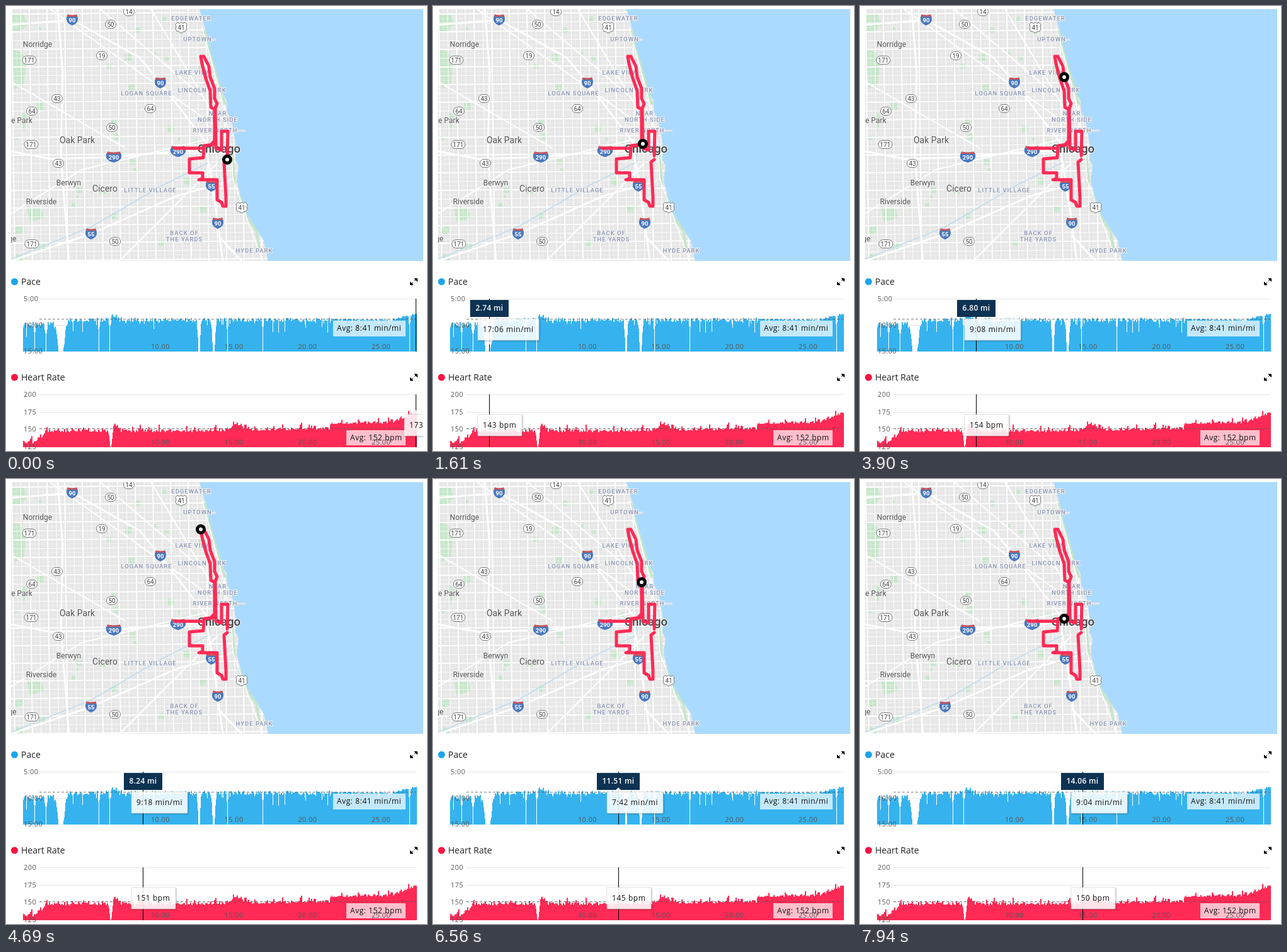
Recreate the animation shown at these times as an HTML page. Size 668 by 707 pixels, loop 8000 ms.

```html
<!DOCTYPE html>
<html lang="en">
<head>
<meta charset="utf-8">
<title>Run replay</title>
<style>
html, body { margin: 0; width: 100%; height: 100%; overflow: hidden; background: #fff; }
svg { display: block; width: 668px; height: 707px; }
text { font-family: "Open Sans", sans-serif; font-size: 12px; fill: #222; }
.map text { font-family: Roboto, sans-serif; text-anchor: middle; fill: #555; paint-order: stroke; stroke: #f2f2f2; stroke-width: 2px; stroke-linejoin: round; }
.map .town { font-size: 12px; }
.map .big { font-size: 14px; }
.map .city { font-size: 18.7px; font-weight: 500; fill: #444; }
.map .area { font-size: 9.5px; font-weight: 500; letter-spacing: 1px; fill: #8b95b3; }
.map .badge { font-size: 10px; fill: #444; stroke: none; }
.map .interstate { font-size: 9.5px; font-weight: 700; fill: #fff; stroke: none; }
.title { font-size: 14px; }
.axis { font-size: 11px; fill: #555; letter-spacing: .4px; }
.note { letter-spacing: .55px; fill: #111; }
.miles { font-weight: 600; letter-spacing: .3px; fill: #fff; text-anchor: middle; }
</style>
</head>
<body>
<svg viewBox="0 0 668 707">
  <defs>
    <clipPath id="mapClip"><rect x="8" y="5" width="654" height="400"/></clipPath>
    <clipPath id="chartClip"><rect x="8" y="420" width="654" height="281"/></clipPath>
    <filter id="shadow" x="-10%" y="-20%" width="125%" height="150%">
      <feDropShadow dx="1" dy="1" stdDeviation="1.2" flood-opacity=".4"/>
    </filter>
  </defs>
  <g class="map" clip-path="url(#mapClip)">
    <rect x="8" y="5" width="654" height="400" fill="#e6e6e6"/>
    <g id="parks" fill="#c6e6c9"></g>
    <g id="streets" fill="none" stroke="#fff"></g>
    <path fill="none" stroke="#bfdcf0" stroke-width="1.6" d="M8 402L135 351L250 284L323 248V222L352 216"/>
    <g id="roads" fill="none" stroke="#fff" stroke-width="2.8" stroke-linejoin="round">
      <path d="M8 30L105 22L212 82L245 122L317 216L336 345L344 405"/>
      <path d="M8 231L72 243L171 240L273 231L346 228"/>
      <path d="M355 278L270 302L135 362L8 405"/>
      <path d="M82 5L90 105L87 238L100 405M336 365L374 405"/>
    </g>
    <path fill="#aadaff" d="M307 5L319 46L322 70L343 137L350 151L351 169L358 181L365 224L364 244L369 253L366 278L379 326L409 373L416 405H662V5Z"/>
    <path fill="none" stroke="#e6e6e6" stroke-width="3" d="M358 198H380M323 55L333 53"/>
    <path fill="none" stroke="#c6e6c9" stroke-width="4" d="M315 38L321 67L342 137L348 157M359 234L363 284M369 300L382 335L397 357L402 385"/>
    <path fill="none" stroke="#fff" stroke-width="1.5" d="M311 33L340 140L357 222L360 275L386 348L407 405"/>
    <g id="labels"></g>
    <g fill="none" stroke="#ff2a55" stroke-width="5" stroke-linejoin="round" stroke-linecap="round">
      <path d="M314 226H268M329 220L314 222V226L313 241L291 243V265H312V274L306 276H335V308L342 312L344 318H349V304L346 248L351 244"/>
      <path id="route"/>
    </g>
    <g id="marker"><circle r="5.5" fill="#fff" stroke="#000" stroke-width="5"/></g>
  </g>
  <g id="charts"></g>
  <g id="hover" clip-path="url(#chartClip)"></g>
</svg>
<script>
const $ = id => document.getElementById(id);
const NS = 'http://www.w3.org/2000/svg';
const set = (node, attrs) => { for (const key in attrs) node.setAttribute(key, attrs[key]); };

function add(parent, tag, attrs, text) {
  const node = document.createElementNS(NS, tag);
  set(node, attrs);
  if (text !== undefined) node.textContent = text;
  return parent.appendChild(node);
}
const write = (parent, cls, x, y, text, extra) => add(parent, 'text', {class: cls, x, y, ...extra}, text);

// Repeatable noise from -1 to 1, a bell curve and a soft step.
const noise = n => { const s = Math.sin(n * 127.1 + 3.7) * 43758.5453; return (s - Math.floor(s)) * 2 - 1; };
const bell = (x, center, width) => Math.exp(-(((x - center) / width) ** 2));
const rise = (x, from, to) => Math.min(1, Math.max(0, (x - from) / (to - from)));

// ---- map ----
function drawMap() {
  for (let i = 0; i < 34; i++) {
    const size = 4 + 7 * Math.abs(noise(i + 200));
    add($('parks'), 'rect', {x: 160 + 150 * noise(i), y: 205 + 195 * noise(i + 100), width: size, height: size * 1.1});
  }
  add($('parks'), 'path', {d: 'M8 12H28L34 30L20 42H8ZM10 68L26 74L32 96L28 124L14 132ZM32 318L56 322L60 336L38 344ZM24 168L34 174L28 200Z'});

  for (const [gap, width, opacity] of [[7, .8, .45], [14, 1.2, .75], [28, 1.9, 1]]) {
    let d = '';
    for (let x = 9; x < 425; x += gap) d += `M${x} 5L${x + 5} 405`;
    for (let y = 11; y < 405; y += gap) d += `M8 ${y + 2}L425 ${y - 2}`;
    add($('streets'), 'path', {d, 'stroke-width': width, opacity});
  }
  add($('streets'), 'path', {'stroke-width': 2, d: 'M70 5L328 188M150 5L310 142M230 5L326 166M8 120L190 226M8 330L120 260L318 212M180 405L335 250'});

  const labels = $('labels');
  const place = (cls, x, y, text) => write(labels, cls, x, y, text);
  place('town', 50, 65, 'Norridge');
  place('town big', 113, 218, 'Oak Park');
  place('town', 99.5, 285, 'Berwyn');
  place('town big', 157, 295, 'Cicero');
  place('town', 56, 315, 'Riverside');
  place('town', 25, 186, 'e Park');
  place('town', 10, 374, 'ge');
  place('area', 294, 23, 'EDGEWATER');
  place('area', 304, 56, 'UPTOWN');
  place('area', 297, 109, 'LAKE VIEW');
  place('area', 223, 142, 'LOGAN SQUARE');
  place('area', 311, 137, 'LINCOLN PARK');
  place('area', 336, 174, 'NEAR');
  place('area', 336, 184, 'NORTH SIDE');
  place('area', 332, 201, 'RIVER NORTH');
  place('area', 229, 296, 'LITTLE VILLAGE');
  place('area', 283, 364, 'BACK OF');
  place('area', 283, 374, 'THE YARDS');
  place('area', 394, 392, 'HYDE PARK');

  const stateRoads = {14: ['195,9'], 19: ['152,79'], 43: ['81,147', '83,250'], 50: ['166,29', '168,193', '173,374'],
    64: ['41,167', '229,163'], 171: ['37,86', '40,220', '41,378']};
  const interstates = {55: ['326,286', '135,362'], 90: ['105,22', '245,122', '336,345'], 290: ['171,240', '273,231']};
  const signs = (roads, cls, drawShape) => {
    for (const [number, spots] of Object.entries(roads)) {
      for (const spot of spots) {
        const sign = add(labels, 'g', {transform: `translate(${spot})`});
        drawShape(sign, number.length > 2);
        write(sign, cls, 0, 4, number);
      }
    }
  };
  signs(stateRoads, 'badge', (sign, wide) => {
    const width = wide ? 22 : 17;
    add(sign, 'rect', {x: -width / 2, y: -6.5, width, height: 13, rx: 6.5, fill: '#fff', stroke: '#777'});
  });
  signs({41: ['278,34', '374,320']}, 'badge', sign =>
    add(sign, 'path', {fill: '#fff', stroke: '#777', d: 'M-6 -8L-3 -6.5L0 -8L3 -6.5L6 -8L9 -5Q7 -1 9 3Q8 7 3 7L0 9L-3 7Q-8 7 -9 3Q-7 -1 -9 -5Z'}));
  signs(interstates, 'interstate', (sign, wide) => {
    const shape = add(sign, 'g', {transform: `scale(${wide ? 1.5 : 1.1} 1.05)`});
    add(shape, 'path', {fill: '#4a78bd', d: 'M-6.5 -8Q0 -6 6.5 -8Q12 4 0 8.5Q-12 4 -6.5 -8Z'});
    add(shape, 'path', {fill: '#d6504e', d: 'M-6.5 -8Q0 -6 6.5 -8L7.5 -5H-7.5Z'});
  });
  place('city', 338, 233, 'Chicago');
}

// ---- charts ----
const LEFT = 27, RIGHT = 651;
const paceY = seconds => 465 + (seconds / 60 - 5) * 8.4;
const heartY = bpm => 617 + (200 - bpm) * 1.107;

// Seconds per mile: steady running, with stops where the pace collapses.
function paceAt(x) {
  const stops = 500 * (bell(x, 87, 6) + bell(x, 306, 2) + bell(x, 329, 2.5))
    + [45, 63, 147, 164, 351, 407, 640].reduce((sum, at) => sum + 420 * bell(x, at, .8), 0);
  const pauses = Math.max(0, noise(x)) ** 10 * (x < 80 ? 420 : x < 515 ? 150 : 40);
  const steady = 540 + 45 * (1 - rise(x, 70, 98)) - 45 * bell(x, 171, 9) - 70 * rise(x, 612, 650);
  return steady + stops + pauses + (x < 515 ? 24 : 12) * noise(x >> 1);
}

// Beats per minute: warm-up, slow drift, a late jump and a final push.
function heartAt(x) {
  const level = 132 + 16 * rise(x, 45, 66) + 4 * rise(x, 300, 510) + 8 * rise(x, 513, 517) + 13 * rise(x, 608, 648);
  const bumps = 9 * bell(x, 173, 6) + 9 * bell(x, 366, 12) - 26 * bell(x, 166, 2.5);
  return level + bumps + 2.5 * noise(x >> 1) + 7 * Math.max(0, noise(x >> 1)) ** 6;
}

function drawChart({name, dot, fill, top, base, valueAt, toY, ticks, average, averageY, box}) {
  const g = $('charts');
  add(g, 'circle', {cx: 13.5, cy: top - 27, r: 5.5, fill: dot});
  write(g, 'title', 24, top - 22, name);
  add(g, 'path', {transform: `translate(647 ${top - 27})`, stroke: '#000', d: 'M1 -1L4 -4M1 -5H5.5V-.5ZM-1 1L-4 4M-1 5H-5.5V.5Z'});
  for (const y in ticks) add(g, 'rect', {x: 53, y, width: RIGHT - 53, height: 1, fill: '#e6e6e6'});

  let d = `M${LEFT} ${base}`;
  for (let x = LEFT; x <= RIGHT; x++) d += `V${Math.min(base, toY(valueAt(x))).toFixed(1)}h1`;
  add(g, 'path', {d: d + `V${base}Z`, fill});
  add(g, 'path', {d: `M53 ${averageY}H${RIGHT}`, stroke: '#555', 'stroke-dasharray': '4 3', opacity: .75});

  const [x, y, width, height] = box;
  add(g, 'rect', {x, y, width, height, fill: '#fff', opacity: .7});
  for (const tick in ticks) write(g, 'axis', 28, +tick + 3.5, ticks[tick]);
  for (let i = 0; i < 4; i++) write(g, 'axis', 260 + i * 116.7, base - 4, `${10 + i * 5}.00`, {'text-anchor': 'end'});
  write(g, 'note', x + 6, y + 16, average);
}

// ---- hover layer ----
const hover = $('hover');
const cursors = [465, 617].map(y => add(hover, 'rect', {y, width: 1, height: 84, fill: '#000'}));
const milesBox = add(hover, 'rect', {y: 467, height: 27, fill: '#0e3252'});
const milesText = write(hover, 'miles', 0, 484, '');

function makeTip(y) {
  const height = 34;
  const g = add(hover, 'g', {});
  const arrow = add(g, 'path', {fill: '#fff', opacity: .87});
  const box = add(g, 'rect', {y, height, rx: 1, fill: '#fff', stroke: '#ccc', 'stroke-width': .6, opacity: .87, filter: 'url(#shadow)'});
  const label = write(g, 'note', 0, y + 21, '');
  return {
    g,
    show(x, width, text, pointY) {
      set(box, {x: x - 18, width});
      set(label, {x: x - 10});
      label.textContent = text;
      const triangle = (from, tip) => `M${x - 7} ${from}L${x} ${tip}L${x + 7} ${from}Z`;
      const below = y + height;
      set(arrow, {d: pointY < y - 2 ? triangle(y, y - 7) : pointY > below + 4 ? triangle(below, below + 7) : ''});
    }
  };
}
const paceTip = makeTip(497);
const heartTip = makeTip(649);

// ---- motion ----
const LOOP = 8000, STEP = 77;
// Each stop: when the pointer gets there, its readings, and the way run since the stop before.
const stops = [
  {time: 160, x: 28, pace: 590, bpm: 133},
  {time: 1610, x: 89, pace: 1026, bpm: 143, way: 'M351 238L352 199H342V229L333 226V219'},
  {time: 3000, x: 149, pace: 524, bpm: 149, way: 'M333 219L332 163L335 155L331 147'},
  {time: 3900, x: 183.7, pace: 548, bpm: 154, way: 'M331 147V131L324 113'},
  {time: 5400, x: 247.6, pace: 521, bpm: 145, way: 'M324 113L322 96L314 80H309L311 92L317 115'},
  {time: 6560, x: 293.6, pace: 462, bpm: 145, way: 'M317 115L324 135L325 161L331 164'},
  {time: 7940, x: 353, pace: 544, bpm: 150, way: 'M331 164V214L324 222'}
];
for (const stop of stops.slice(1)) {
  stop.path = add($('roads'), 'path', {d: stop.way, visibility: 'hidden'});
  stop.length = stop.path.getTotalLength();
}

function stateAt(time) {
  if (time < stops[0].time) return {resting: true, x: 650, bpm: 173, pace: 470, spot: {x: 351, y: 244}};
  const next = Math.max(1, stops.findIndex(s => s.time > time));
  const i = time >= stops[stops.length - 1].time ? stops.length - 1 : next;
  const [a, b] = [stops[i - 1], stops[i]];
  const span = b.time - a.time, count = Math.round(span / STEP);
  const k = Math.min(1, Math.floor((time - a.time) / span * count) / count);
  const mix = key => a[key] + (b[key] - a[key]) * k;
  const x = mix('x'), wobble = Math.sin(Math.PI * k) * noise(Math.round(x));
  return {
    x,
    pace: Math.round((k > 0 && k < 1 ? Math.min(paceAt(Math.round(x)), 1200) : mix('pace'))),
    bpm: Math.round(mix('bpm') + 4 * wobble),
    spot: b.path.getPointAtLength(b.length * k)
  };
}

const clock = s => `${Math.floor(s / 60)}:${String(s % 60).padStart(2, '0')}`;

function render(time) {
  const {resting, x: pointer, pace, bpm, spot} = stateAt(time);
  const x = Math.round(pointer);
  set($('marker'), {transform: `translate(${spot.x} ${spot.y})`});
  for (const line of cursors) set(line, {x});
  for (const node of [milesBox, milesText, paceTip.g]) set(node, {visibility: resting ? 'hidden' : 'visible'});

  const miles = ((pointer - 25.1) / 23.32).toFixed(2);
  const width = miles.length > 4 ? 68 : 61;
  const left = Math.max(8, x - Math.floor(width / 2));
  set(milesBox, {x: left, width});
  set(milesText, {x: left + width / 2});
  milesText.textContent = miles + ' mi';
  paceTip.show(x, pace >= 600 ? 97 : 89, clock(pace) + ' min/mi', paceY(pace));
  heartTip.show(x, 70, bpm + ' bpm', heartY(bpm));
}

drawMap();
set($('route'), {d: stops.slice(1).map(s => s.way).join('')});
drawChart({
  name: 'Pace', dot: '#1ba5ea', fill: '#36b3ee', top: 465, base: 549, valueAt: paceAt, toY: paceY,
  ticks: {465: '5:00', 507: '10:00', 548: '15:00'}, average: 'Avg: 8:41 min/mi', averageY: 497.5, box: [519, 500, 115, 25]
});
drawChart({
  name: 'Heart Rate', dot: '#fb1240', fill: '#ff2a55', top: 617, base: 701, valueAt: heartAt, toY: heartY,
  ticks: {617: '200', 645: '175', 672: '150', 700: '125'}, average: 'Avg: 152 bpm', averageY: 671.5, box: [540, 674, 94, 24]
});

const start = performance.now();
function tick() {
  render((performance.now() - start) % LOOP);
  requestAnimationFrame(tick);
}
tick();
</script>
</body>
</html>
```
